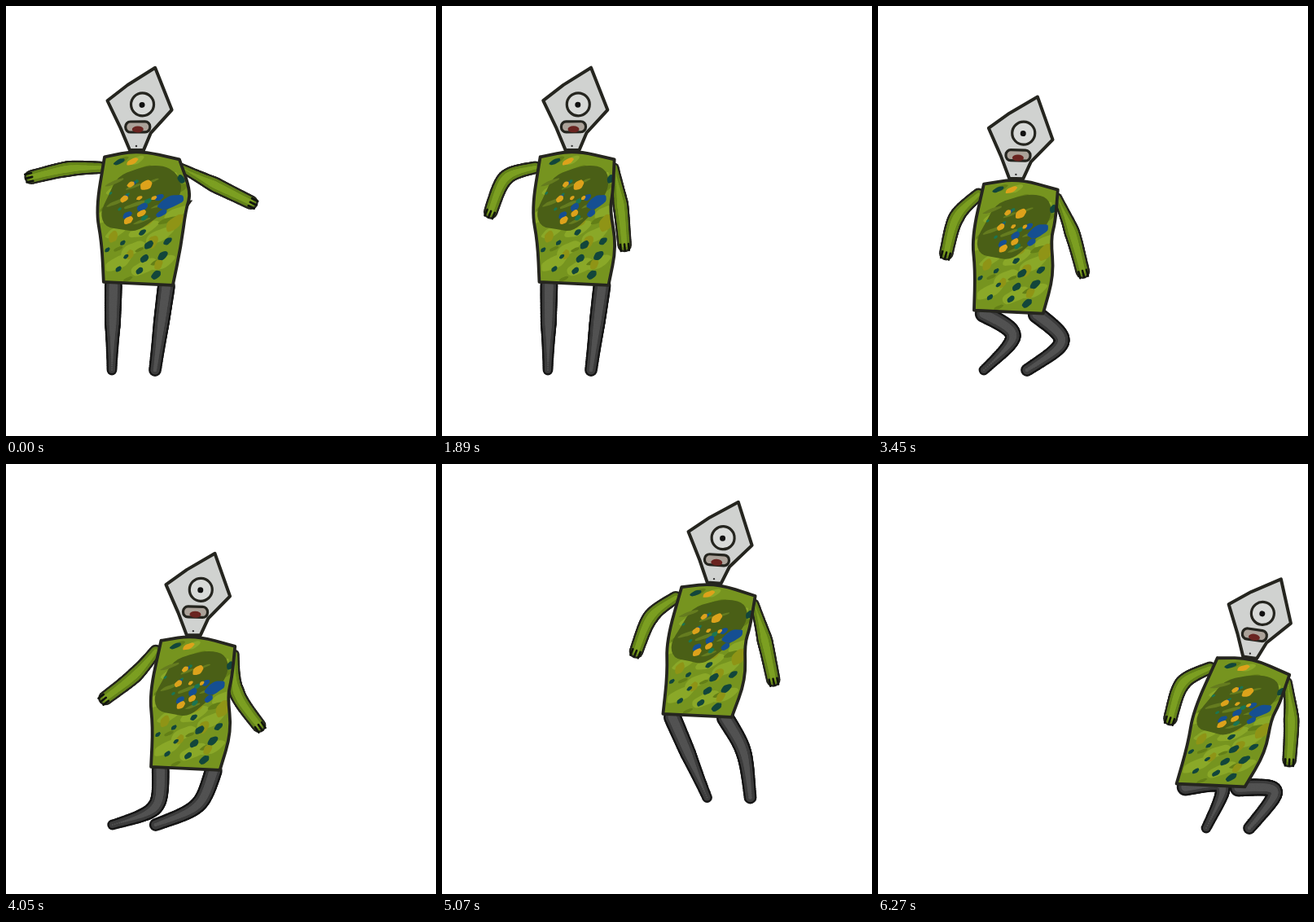
An HTML page with a canvas for the animation above (6.3 s loop, 528 by 528 pixels).

```html
<!DOCTYPE html>
<html>
<head>
<meta charset="utf-8">
<title>Jumping paper figure</title>
<style>
html, body { margin: 0; width: 100%; height: 100%; overflow: hidden; background: #fff; }
canvas { display: block; }
</style>
</head>
<body>
<canvas id="stage" width="528" height="528"></canvas>
<script>
const ctx = document.getElementById('stage').getContext('2d');
const LOOP = 6300, STEP = 30, RAD = Math.PI / 180, SPINE = 162;
const INK = '#25251f';

const mix = (a, b, u) => a + (b - a) * u;
const unit = x => Math.max(0, Math.min(1, x));
const ease = (t, from, to) => {
  const u = unit((t - from) / (to - from));
  return u * u * (3 - 2 * u);
};
const bump = (t, mid, width) => Math.exp(-(((t - mid) / width) ** 2));
const softMin = (a, b, s) => (a + b - Math.hypot(a - b, s)) / 2;
const polar = ([x, y], deg, r) => [x + r * Math.cos(deg * RAD), y + r * Math.sin(deg * RAD)];

function hermite(p, q, m, n, u) {
  const v = u * u, w = v * u;
  return p * (2 * w - 3 * v + 1) + m * (w - 2 * v + u) + q * (3 * v - 2 * w) + n * (w - v);
}

// Arm poses: time, left upper and forearm angle, right upper and forearm angle.
const arms = [
  [0, 178, 167, 27, 26], [660, 158, 145, 55, 60], [1020, 145, 102, 82, 82],
  [1980, 165, 113, 80, 85], [2610, 225, 102, -23, 101], [3000, 190, 135, 25, 88],
  [3450, 135, 105, 67, 75], [3960, 130, 130, 92, 62], [4620, 144, 265, 14, -8],
  [5070, 143, 112, 74, 78], [6270, 152, 108, 84, 93]];

// Smooth curve through the poses, flat at turning points.
function armAngles(t) {
  const last = arms.length - 1, i = Math.max(0, arms.findLastIndex(k => k[0] <= t));
  const p = arms[Math.min(i, last - 1)], q = arms[Math.min(i + 1, last)], d = q[0] - p[0];
  const before = arms[i - 1] || p, after = arms[i + 2] || q;
  const rate = (a, b, c) => a === b ? 0 : (b[c] - a[c]) / (b[0] - a[0]);
  const blend = (a, b) => a * b <= 0 ? 0 : 2 * a * b / (a + b);
  return [1, 2, 3, 4].map(c => {
    const r = rate(p, q, c);
    return hermite(p[c], q[c], d * blend(rate(before, p, c), r), d * blend(r, rate(q, after, c)), (t - p[0]) / d);
  });
}

// Sway back, crouch, fly along a parabola, land in a squat.
function pose(t) {
  const sway = bump(t, 2610, 400);
  const run = 0.102 * (t - 3368);
  const x = 160 - 11 * sway + (run + Math.hypot(run, 6)) / 2;
  const stand = 180 + 44 * ease(t, 2000, 4000) + 18 * ease(t, 5000, 6000);
  const y = softMin(stand, 148 + 1.1e-4 * (t - 4900) ** 2, 25);
  const lean = -1 + 4 * ease(t, 2000, 3500) + 4 * ease(t, 3900, 5100) + 10 * ease(t, 5200, 6270);
  const hop = unit((t - 4000) / 1650);
  return {
    neck: [x, y],
    hip: polar([x, y], 90 + lean, SPINE),
    chest: lean * 0.65,
    bend: lean + 14 * sway + 8 * bump(t, 4500, 400),
    head: lean * 0.5 + 4 * sway,
    foot: [130 + 273 * ease(t, 4000, 5650), 447 - 42 * Math.sin(Math.PI * hop)]
  };
}

// Closed smooth outline through the midpoints; doubled points give corners.
function blobPath(pts) {
  const n = pts.length;
  ctx.beginPath();
  for (let i = 0; i <= n; i++) {
    const [x, y] = pts[i % n], [X, Y] = pts[(i + 1) % n];
    if (i) ctx.quadraticCurveTo(x, y, (x + X) / 2, (y + Y) / 2);
    else ctx.moveTo((x + X) / 2, (y + Y) / 2);
  }
}

function poly(pts) {
  ctx.beginPath();
  pts.forEach(p => ctx.lineTo(...p));
  ctx.closePath();
}

function disc(x, y, r, color) {
  ctx.fillStyle = color;
  ctx.beginPath();
  ctx.arc(x, y, r, 0, 7);
  ctx.fill();
}

// Tapered limb bent at joint e: a stack of outline, skin and highlight.
function limb(s, e, f, radii, colors) {
  const k = [0, 1].map(c => e[c] + (e[c] - (s[c] + f[c]) / 2) * 0.25);
  colors.forEach((color, layer) => {
    for (let i = 0; i <= 60; i++) {
      const u = i / 60, v = 1 - u;
      const [x, y] = [0, 1].map(c => v * v * v * s[c] + 3 * u * v * k[c] + u * u * u * f[c]);
      const r = u < 0.5 ? mix(radii[0], radii[1], u * 2) : mix(radii[1], radii[2], u * 2 - 1);
      disc(x, y, Math.max(1, r + [2.4, 0, -3.2][layer]), color);
    }
  });
}

function arm(s, upper, fore, lens, radii) {
  const e = polar(s, upper, lens[0]), f = polar(e, fore, lens[1]);
  limb(s, e, f, radii, [INK, '#64831a', '#7c9f22']);
  ctx.strokeStyle = '#11140c';
  ctx.lineWidth = 2.6;
  ctx.beginPath();
  for (const side of [-5, 0, 5]) {
    const base = polar(f, fore + 90, side);
    ctx.moveTo(...polar(base, fore, -1));
    ctx.lineTo(...polar(base, fore, 7));
  }
  ctx.stroke();
}

// Two-bone leg with the knee bending to the right.
function leg(hip, foot, end) {
  const A = 47, B = 57, dx = foot[0] - hip[0], dy = foot[1] - hip[1];
  const d = Math.hypot(dx, dy), along = (A * A - B * B + d * d) / (2 * d);
  const out = Math.sqrt(Math.max(0, A * A - along * along));
  const knee = [hip[0] + (dx * along + dy * out) / d, hip[1] + (dy * along - dx * out) / d];
  limb(hip, knee, foot, [8.5, 7.5, end], ['#161616', '#3c3c3c', '#525252']);
}

const shirt = [[119, 185], [119, 185], [160, 177], [210, 189], [210, 189], [208, 230], [204, 250],
  [212, 295], [202, 343], [202, 343], [117, 339], [117, 339], [115, 290], [108, 250]];

// Evenly spread spots in an oval, on a sunflower spiral.
const scatter = (color, n, cx, cy, rx, ry, size, phase, flat = 0.85) =>
  Array.from({ length: n }, (_, i) => {
    const a = i * 2.4 + phase, r = Math.sqrt((i + 0.5) / n);
    const w = size * (0.9 + 0.3 * Math.sin(i * 4 + phase));
    return [color, cx + rx * r * Math.cos(a), cy + ry * r * Math.sin(a), w, w * flat];
  });

const DARK = '#12463b', BLUE = '#154f92', YELLOW = '#dda21b';
const paint = [
  ...scatter('#8aa828', 16, 160, 262, 46, 82, 14, 1, 0.5),
  ...scatter('#637f17', 12, 160, 262, 48, 82, 9, 3, 0.4),
  ...scatter('#8f9416', 6, 165, 290, 42, 45, 7, 0, 1.2),
  ['#4a5f16', 158, 236, 42, 37],
  ...scatter('#657c1f', 7, 158, 236, 36, 32, 10, 2, 0.2),
  ...scatter(DARK, 11, 160, 306, 42, 34, 5, 0.6),
  ...scatter('#1a7552', 6, 152, 238, 28, 30, 3, 4),
  ...scatter(BLUE, 6, 158, 240, 30, 26, 4.5, 1.2),
  ...scatter(YELLOW, 6, 156, 243, 22, 26, 4.5, 5),
  [BLUE, 188, 241, 12, 7.5], [YELLOW, 166, 220, 6.5, 5.5], [YELLOW, 153, 191, 7, 3.5],
  [DARK, 137, 191, 7, 3], [DARK, 205, 213, 4, 5]];

function drawHead([x, y], deg) {
  ctx.save();
  ctx.translate(x, y - 2);
  ctx.rotate(deg * RAD);
  ctx.strokeStyle = INK;
  poly([[24, -102], [44, -50], [18, -22], [9, -1], [-8, -1], [-19, -28], [-35, -62], [-10, -81]]);
  ctx.fillStyle = '#d0d2d0';
  ctx.lineWidth = 4;
  ctx.fill();
  ctx.stroke();
  ctx.lineWidth = 3.2;
  disc(8, -57, 14, '#d8dad8');
  ctx.stroke();
  disc(7.5, -56.5, 3.5, '#111');
  ctx.fillStyle = '#aba299';
  ctx.beginPath();
  ctx.roundRect(-13, -36, 30, 13, 6);
  ctx.fill();
  ctx.stroke();
  ctx.fillStyle = '#6a2420';
  ctx.beginPath();
  ctx.ellipse(2, -26.5, 7, 4, 0, 0, 7);
  ctx.fill();
  disc(0, -6, 1.2, '#333');
  ctx.restore();
}

function draw(t) {
  const { neck, hip, chest, bend, head, foot } = pose(t);
  const [leftUp, leftFore, rightUp, rightFore] = armAngles(t);
  const pull = 14 * unit((70 - rightUp) / 45); // raised arm stretches the shirt

  // Places a point of the flat shirt on the bent spine.
  const place = ([x, y]) => {
    const v = (y - 180) / SPINE, turn = chest * (1 - v);
    const stretch = pull * Math.max(0, (x - 145) / 45) * bump(y, 238, 28);
    const top = polar([0, 0], 90 + chest, SPINE), low = polar([0, 0], 90 + bend, SPINE);
    const mid = [0, 1].map(c => hermite(neck[c], hip[c], top[c], low[c], v));
    return polar(mid, turn, x - 158 - 2 * v + stretch);
  };

  ctx.fillStyle = '#fff';
  ctx.fillRect(0, 0, 528, 528);
  ctx.lineJoin = ctx.lineCap = 'round';

  leg([hip[0] - 31, hip[1] + 1], foot, 4);
  leg([hip[0] + 34, hip[1] + 2], [foot[0] + 53, foot[1]], 5.5);
  arm(place([113, 198]), leftUp, leftFore, [39, 46], [5.5, 7.5, 6.5]);
  arm(place([210, 199]), rightUp, rightFore, [46, 50], [3.5, 7.5, 6.5]);
  drawHead(neck, head);

  if (pull > 5) {
    const [x, y] = place([200, 242]);
    poly([[x, y - 3], [x + 11, y - 3], [x + 3, y + 8]]);
    ctx.fillStyle = INK;
    ctx.fill();
  }

  const outline = shirt.map(place);
  blobPath(outline);
  ctx.fillStyle = '#76941f';
  ctx.fill();
  ctx.save();
  ctx.clip();
  for (const [color, x, y, w, h] of paint) {
    const pts = Array.from({ length: 12 }, (_, i) => {
      const a = i * Math.PI / 6, r = 1.03 + 0.1 * Math.sin(i * 2.4 + x);
      const px = w * r * Math.cos(a), py = h * r * Math.sin(a);
      return place([x + px, y + py - px * 0.4]);
    });
    ctx.fillStyle = color;
    blobPath(pts);
    ctx.fill();
  }
  ctx.restore();
  blobPath(outline);
  ctx.strokeStyle = INK;
  ctx.lineWidth = 3.8;
  ctx.stroke();
}

const start = performance.now();
function tick() {
  const t = (performance.now() - start) % LOOP;
  draw(Math.floor(t / STEP) * STEP);
  requestAnimationFrame(tick);
}
tick();
</script>
</body>
</html>
```
